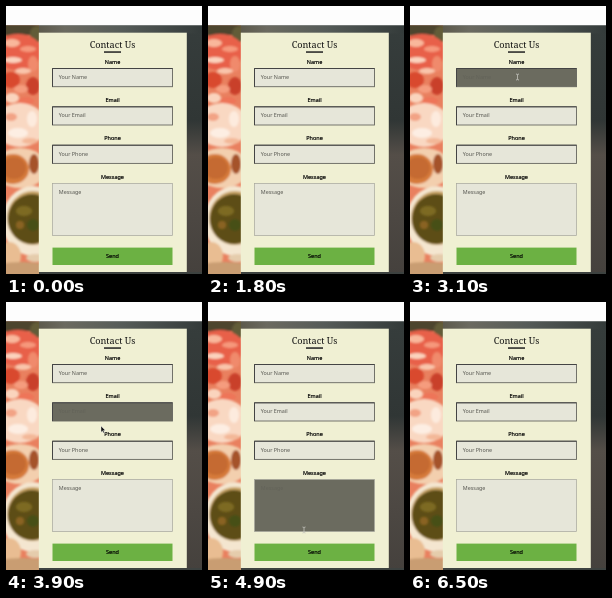
Recreate the animation shown at these times as an HTML page. Size 196 px wide and 268 px high, loop 6.6 s.

```html
<!DOCTYPE html>
<html lang="en">
<head>
<meta charset="utf-8">
<title>Contact form</title>
<style>
html, body { margin: 0; width: 100%; height: 100%; overflow: hidden; background: #fdfdfd; }
svg { display: block; width: 196px; height: 268px; }
text { font-family: "Noto Sans", "Open Sans", sans-serif; }
.label { font-size: 5.5px; text-anchor: middle; fill: #000; stroke: #000; stroke-width: .18; }
.hint { font-size: 5.4px; fill: #55554f; }
.title { font: 500 9.1px "Noto Serif", serif; text-anchor: middle; fill: #111; }
</style>
</head>
<body>
<svg viewBox="0 0 196 268">
  <defs>
    <filter id="soft" x="-30%" y="-30%" width="160%" height="160%"><feGaussianBlur stdDeviation=".9"/></filter>
    <linearGradient id="band">
      <stop offset="0" stop-color="#4b4634"/><stop offset=".3" stop-color="#6b6a60"/>
      <stop offset=".6" stop-color="#555b58"/><stop offset="1" stop-color="#343b3a"/>
    </linearGradient>
    <linearGradient id="side" x2="0" y2="1">
      <stop offset="0" stop-color="#363d3c"/><stop offset=".38" stop-color="#303635"/>
      <stop offset=".52" stop-color="#544e48"/><stop offset="1" stop-color="#45413d"/>
    </linearGradient>
    <clipPath id="strip"><path d="M0 19.5H33V268H0z"/></clipPath>
  </defs>
  <rect width="196" height="268" fill="#fdfdfd"/>
  <rect y="19.5" width="196" height="249" fill="url(#side)"/>
  <rect y="19.5" width="196" height="8" fill="url(#band)"/>
  <g clip-path="url(#strip)">
    <rect y="19.5" width="33" height="249" fill="#e9805f"/>
    <g id="photo" filter="url(#soft)"></g>
  </g>
  <rect x="32.8" y="26.7" width="148" height="239.3" fill="#f0f0d3"/>
  <rect x="33" y="266" width="163" height="2" fill="#3d4240"/>
  <text class="title" x="106.5" y="41.5">Contact Us</text>
  <rect x="98" y="45.3" width="17" height="1.5" fill="#222"/>
  <g id="form"></g>
  <g id="pointer">
    <path id="arrow" d="M0 0V6.2L1.5 4.9L2.5 7L3.5 6.5L2.5 4.5H4.4Z" fill="#111" stroke="#fff" stroke-width=".4"/>
    <path id="beam" d="M-1.5 -3Q0 -3 0 -2Q0 -3 1.5 -3M0 -2V2M-1.5 3Q0 3 0 2Q0 3 1.5 3" fill="none" stroke="#c4c4bd" stroke-width=".8"/>
    <path id="hand" d="M-.6 -2.6Q0 -3.2 .5 -2.6V-.6L2.2 0V1.6L1.5 2.8H-.8L-2 .8L-1.4 .3L-.6 1Z" fill="#fff" stroke="#222" stroke-width=".5"/>
  </g>
</svg>
<script>
const LOOP = 6600, STEP = 100;
const $ = id => document.getElementById(id);

function add(parent, tag, attrs, text) {
  const el = document.createElementNS("http://www.w3.org/2000/svg", tag);
  for (const k in attrs) el.setAttribute(k, attrs[k]);
  if (text) el.textContent = text;
  return parent.appendChild(el);
}

// Soft background shapes: cx, cy, rx, ry, colour
[
  [8, 23, 30, 7, "#4d452f"], [31, 28, 7, 8, "#625b38"],
  [12, 46, 24, 18, "#e8604a"], [6, 37, 8, 4, "#f9b79b"], [22, 43, 8, 3, "#f6987c"],
  [7, 54, 9, 3, "#fbd3bd"], [27, 58, 5, 8, "#f08a6c"], [17, 65, 8, 3, "#f9c5ab"],
  [5, 74, 9, 8, "#d9482f"], [27, 80, 7, 9, "#c9402c"], [15, 83, 7, 4, "#f59c7e"],
  [6, 92, 7, 5, "#fad4bd"], [20, 95, 8, 4, "#ee7558"],
  [14, 119, 26, 22, "#f9d8c2"], [5, 111, 6, 4, "#f2a385"], [26, 113, 5, 8, "#fdebde"],
  [12, 127, 10, 5, "#fdeee3"], [24, 135, 8, 3, "#f3b898"],
  [14, 162, 27, 20, "#f3cfae"], [7, 163, 16, 15, "#d67a3b"], [8, 162, 12, 11, "#c56b32"],
  [28, 158, 5, 10, "#a5522c"],
  [27, 215, 31, 35, "#f4e6d0"], [27, 212, 26, 27, "#c6a263"], [26, 213, 24, 25, "#5d4d18"],
  [18, 205, 8, 5, "#7d6a22"], [27, 219, 6, 6, "#465016"], [14, 219, 4, 4, "#8a6420"],
  [3, 250, 12, 14, "#e9bd92"], [16, 264, 30, 8, "#c99d72"], [30, 252, 10, 4, "#e5ccac"]
].forEach(([cx, cy, rx, ry, fill]) => add($("photo"), "ellipse", {cx, cy, rx, ry, fill}));

// Each control darkens between "on" and "off"
const fields = [
  {name: "Name", hint: "Your Name", y: 62.5, h: 18.2, on: 2700, off: 3450},
  {name: "Email", hint: "Your Email", y: 100.8, h: 18.2, on: 3450, off: 3900},
  {name: "Phone", hint: "Your Phone", y: 139.2, h: 18.2, on: 3950, off: 4300},
  {name: "Message", hint: "Message", y: 177.5, h: 52, on: 4300, off: 5000},
  {name: "Send", y: 241.6, h: 17.4, on: 5150, off: 5850}
];
const LIGHT = [230, 230, 217], DARK = [107, 107, 95];
const GREEN = [108, 177, 67], DEEP = [4, 91, 8];

fields.forEach(f => {
  const g = $("form"), area = f.h > 20, send = !f.hint;
  f.box = add(g, "rect", {x: 46.5, y: f.y, width: 120, height: f.h});
  if (send) {
    add(g, "text", {class: "label", x: 106.5, y: f.y + 9.9}, f.name);
    return;
  }
  f.box.setAttribute("stroke", area ? "#a6a69c" : "#66665f");
  f.box.setAttribute("stroke-width", area ? .7 : .9);
  if (!area) add(g, "path", {d: `M46.5 ${f.y + f.h}V${f.y}H166.5`, fill: "none", stroke: "#444"});
  add(g, "text", {class: "label", x: 106.5, y: f.y - 5}, f.name);
  f.text = add(g, "text", {class: "hint", x: 52.8, y: f.y + 10.4}, f.hint);
});

// Pointer stops: time, x, y
const path = [
  [2500, 200, 66], [2900, 118, 70], [3100, 107.5, 71], [3500, 101, 101], [3900, 95, 124],
  [4400, 94, 178], [4900, 96, 228], [5200, 96, 243], [5500, 96, 249], [5800, 100, 260], [6100, 110, 276]
];

const clamp = v => Math.max(0, Math.min(1, v));
const mix = (a, b, k) => `rgb(${a.map((v, i) => Math.round(v + (b[i] - v) * k))})`;

function pointerAt(t) {
  const i = path.findIndex(p => p[0] > t);
  if (i < 1) return null;
  const [a, b] = [path[i - 1], path[i]], k = (t - a[0]) / (b[0] - a[0]);
  return [a[1] + (b[1] - a[1]) * k, a[2] + (b[2] - a[2]) * k];
}

function draw(t) {
  fields.forEach(f => {
    const k = clamp((t - f.on) / 200) * clamp(1 - (t - f.off) / 200);
    f.box.setAttribute("fill", f.hint ? mix(LIGHT, DARK, k) : mix(GREEN, DEEP, k));
    if (f.text) f.text.style.opacity = 1 - .6 * k;
  });
  const p = pointerAt(t);
  $("pointer").style.display = p ? "" : "none";
  if (!p) return;
  const [x, y] = p;
  const over = fields.find(f => x > 46 && x < 167 && y >= f.y && y <= f.y + f.h);
  const shape = !over ? "arrow" : over.hint ? "beam" : "hand";
  for (const id of ["arrow", "beam", "hand"]) $(id).style.display = id === shape ? "" : "none";
  $("pointer").setAttribute("transform", `translate(${x} ${y})`);
}

const start = performance.now();
function tick() {
  const t = (performance.now() - start) % LOOP;
  draw(Math.floor(t / STEP) * STEP);
  requestAnimationFrame(tick);
}
tick();
</script>
</body>
</html>
```
